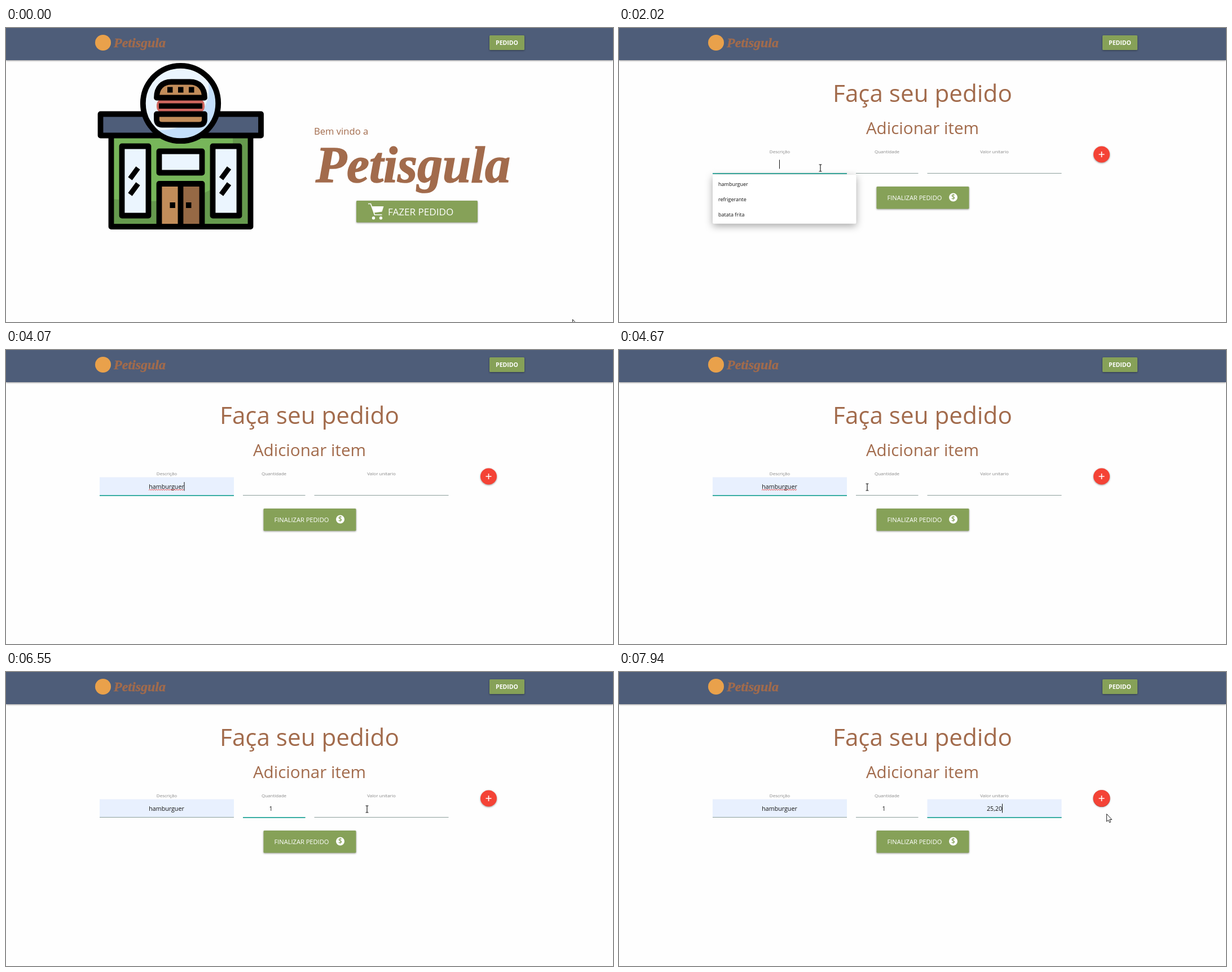
Write an HTML page that moves like this. It is 1076 px wide and 521 px high and loops after 8000 ms.

```html
<!DOCTYPE html>
<html lang="pt">
<head>
<meta charset="utf-8">
<title>Pedido</title>
<style>
  html, body { margin: 0; width: 100%; height: 100%; overflow: hidden; background: #fefefe; }
  svg { display: block; width: 100%; height: 100%; }
  text { font-family: "Open Sans", "Noto Sans", sans-serif; }
  .brand { font: italic bold 90px "Liberation Serif", "Times New Roman", serif; fill: #a26b4c; stroke: #a26b4c; stroke-width: 1.6px; }
  .brown { fill: #a26b4c; }
  .white { fill: #fff; }
  .green { fill: #86a158; }
  .raised { filter: drop-shadow(0 1.5px 1.5px rgba(0, 0, 0, .4)); }
  .popup { filter: drop-shadow(0 4px 7px rgba(0, 0, 0, .35)); }
  .mid { text-anchor: middle; }
  .label { font-size: 8px; fill: #868686; }
  .value { font-size: 10.7px; fill: #111; }
  .item { font-size: 9px; fill: #111; }
  .line { fill: #8c9f9c; }
  .focus { fill: #26a69a; }
  .filled { fill: #e8f0fe; }
  .ink { stroke: #000; stroke-width: 9.8; stroke-linejoin: round; }
  .glass { fill: #ebf5fe; }
  .bun { fill: #c28d5a; }
</style>
</head>
<body>
<svg viewBox="0 0 1076 521" preserveAspectRatio="none">
  <defs>
    <clipPath id="orderClip"><rect x="621" y="306" width="215" height="38.5" rx="1.5"/></clipPath>
    <g id="glint"><path d="M220 267L234 248M220 295L234 276" stroke="#000" stroke-width="9"/></g>
    <g id="pick">
      <rect x="3.5" y="2.5" width="221" height="26.5" rx="1.5" fill="#e0edfa" stroke="#62a0d2"/>
      <path d="M233.5 11.5h9.5M236.5 11.5v-1.5h3.5v1.5M234.5 11.5v9.5h7.5v-9.5M237 13.5v5.5M239.5 13.5v5.5" fill="none" stroke="#555"/>
    </g>
  </defs>
  <rect width="1076" height="521" fill="#fefefe"/>

  <!-- header -->
  <rect class="raised" width="1076" height="57" fill="#4e5d79"/>
  <circle cx="172" cy="26" r="14" fill="#e9a14b"/>
  <text class="brand" x="191" y="34" style="font-size:24px;stroke-width:.4px">Petisgula</text>
  <rect class="green raised" x="857" y="13" width="62" height="26" rx="1.5"/>
  <text class="white mid" x="888" y="29.5" font-size="10.5" font-weight="700">PEDIDO</text>

  <!-- welcome page -->
  <g data-on="0-1390">
    <rect x="186.500" y="180" width="247" height="172" fill="#77b65a"/>
    <path d="M402 190C406 290 350 318 187 303V352H433V190Z" fill="#669a4e"/>
    <rect class="ink" x="186.500" y="180" width="247" height="172" fill="none"/>
    <rect class="ink" x="167.500" y="152.500" width="284.500" height="38" fill="#4e5d79"/>
    <circle class="glass" cx="309.500" cy="133.500" r="67"/>
    <path d="M356.9 86.1C372 150 320 185 262.1 180.900A67 67 0 0 0 356.900 86.100Z" fill="#c4dffb"/>
    <circle class="ink" cx="309.500" cy="133.500" r="66.700" fill="none"/>
    <rect x="267" y="126" width="85" height="24" rx="10" fill="#cf665e"/>
    <path class="ink bun" d="M267 123.500C267 106 277 95.500 293 95.500H326C342 95.500 352 106 352 123.500Z"/>
    <path d="M286 104.500h9.500v10h-9.500zM305 104.500h9.500v10h-9.500zM324 104.500h9.500v10h-9.500zM271 133.500h77v9.500h-77z"/>
    <path class="ink bun" d="M267 152.500H352V162Q352 171.500 342 171.500H277Q267 171.500 267 162Z"/>
    <rect class="ink glass" x="205.500" y="209.500" width="47" height="123"/>
    <rect class="ink glass" x="366.500" y="209.500" width="47" height="123"/>
    <use href="#glint"/><use href="#glint" x="161.500"/>
    <rect class="ink glass" x="271.500" y="218.500" width="76" height="38"/>
    <rect class="bun" x="271.500" y="276" width="38" height="76"/>
    <rect x="309.500" y="276" width="38" height="76" fill="#966945"/>
    <path class="ink" d="M271.500 276h76v76h-76zM309.500 276v76" fill="none"/>
    <path d="M290.500 309h9.500v10h-9.500zM319 309h9.500v10h-9.500z"/>

    <text class="brown" x="546" y="189" font-size="16.6">Bem vindo a</text>
    <text class="brand" x="549" y="273">Petisgula</text>
    <rect class="green raised" x="621" y="306" width="215" height="38.500" rx="1.5"/>
    <g clip-path="url(#orderClip)">
      <rect id="hover" class="brown" x="621" y="306" width="215" height="38.500"/>
      <circle id="ripple" class="white" cx="797" cy="327" r="0" opacity=".19"/>
    </g>
    <path d="M642 311.500h4.500l7 19.500h13" fill="none" stroke="#fff" stroke-width="1.600"/>
    <path class="white" d="M648.500 316H669.500L666.500 325.500 652 327.500Z"/>
    <circle class="white" cx="651.500" cy="336.800" r="2.700"/><circle class="white" cx="664.500" cy="336.800" r="2.700"/>
    <text class="white" x="677" y="332" font-size="17.100">FAZER PEDIDO</text>
  </g>

  <!-- order page -->
  <g data-on="1390-8000">
    <text class="brown mid" x="538" y="131" font-size="42.2">Faça seu pedido</text>
    <text class="brown mid" x="538" y="188" font-size="29.6">Adicionar item</text>
    <text class="label mid" x="285" y="222">Descrição</text>
    <text class="label mid" x="475" y="222">Quantidade</text>
    <text class="label mid" x="665.5" y="222">Valor unitario</text>

    <rect class="filled" x="166" y="225.500" width="238" height="32" data-on="2230-8000"/>
    <rect class="filled" x="546.500" y="225.500" width="238" height="32" data-on="6960-8000"/>
    <rect class="line" x="166" y="257" width="238" height="1"/>
    <rect class="line" x="420" y="257" width="110.500" height="1"/>
    <rect class="line" x="546.500" y="257" width="238" height="1"/>
    <rect class="focus" x="166" y="257" width="238" height="1.800" data-on="1900-4950"/>
    <rect class="focus" x="420" y="257" width="110.500" height="1.800" data-on="4950-6750"/>
    <rect class="focus" x="546.500" y="257" width="238" height="1.800" data-on="6750-8000"/>

    <text class="value mid" x="284.500" y="246" data-on="2230-8000">hamburguer</text>
    <path id="squiggle" fill="none" stroke="#e53935" stroke-width=".9" data-on="3150-4950"/>
    <text class="value mid" x="469.500" y="246" data-on="5920-8000">1</text>
    <text class="value mid" x="665.500" y="246" data-on="6960-7280">5</text>
    <text class="value mid" x="665.500" y="246" data-on="7280-8000">25,20</text>

    <g data-on="4820-6150">
      <rect x="519.500" y="233.500" width="10.500" height="16" fill="#efefef"/>
      <rect x="519.500" y="241.500" width="10.500" height="8" fill="#c8c8c8"/>
      <path d="M522 239.500l2.800-3 2.800 3zM522 244l2.800 3 2.800-3z" fill="#444"/>
    </g>
    <g stroke="#111">
      <path d="M284.500 233.500v16" data-on="1900-2350,2850-3150"/>
      <path d="M316 234v15.500" data-on="3150-3550,4050-4580"/>
      <path d="M470 233.500v16" data-on="4950-5250,5550-5720"/>
      <path d="M473.500 233.500v16" data-on="5920-6350"/>
      <path d="M665.500 233.500v16" data-on="6750-7250"/>
      <path d="M679.500 233.500v16" data-on="7600-8000"/>
    </g>

    <circle id="pulse" cx="855.500" cy="224" r="14.500" fill="#f44336"/>
    <circle class="raised" cx="855.500" cy="224" r="14.500" fill="#f44336"/>
    <path d="M850.500 224h10M855.500 219v10" stroke="#fff" stroke-width="1.600"/>

    <rect class="green raised" x="456.500" y="281" width="164" height="39.500" rx="1.5"/>
    <text class="white" x="475.500" y="305" font-size="11.1">FINALIZAR PEDIDO</text>
    <circle class="white" cx="592.500" cy="300" r="7.500"/>
    <text class="green mid" x="592.500" y="304.300" font-size="12" font-weight="600">$</text>

    <g transform="translate(166 260)" data-on="1920-3150">
      <rect class="white popup" width="254.500" height="86.800" rx="2"/>
      <use href="#pick" data-on="2230-3150"/>
      <text class="item" x="10" y="19.500">hamburguer</text>
      <text class="item" x="10" y="46.500">refrigerante</text>
      <text class="item" x="10" y="73.500">batata frita</text>
    </g>
    <g transform="translate(546.500 260)" data-on="6800-7600">
      <rect class="white popup" width="254.500" height="86.800" rx="2"/>
      <use href="#pick" data-on="6960-7280"/>
      <use href="#pick" y="27" data-on="7280-7600"/>
      <text class="item" x="10" y="19.500">5</text>
      <text class="item" x="10" y="46.500">25,20</text>
      <text class="item" x="10" y="73.500">8,90</text>
    </g>
  </g>

  <g id="cursor" stroke-linejoin="round">
    <path d="M.5 .5V14L3.500 11.300 5.500 15.800 7.600 14.900 5.700 10.500H9.700Z" fill="#fff" stroke="#222"
      data-on="0-630,1390-1800,2180-3300,4220-4420,5350-6150,6910-8000"/>
    <path d="M-1.300 10V1.500Q0-.5 1.300 1.500V6.500L4 7 6.500 8V13L4.800 17.500H-1.500L-5 12Q-4.500 9.500-1.300 12Z" fill="#fff" stroke="#222"
      data-on="630-1390"/>
    <path d="M-2.500-6H-.7L0-5.300.7-6H2.500M0-5.300V5.300M-2.500 6H-.7L0 5.300.7 6H2.500" fill="none" stroke="#222" stroke-width="1.200"
      data-on="1800-2180,4420-5350,6150-6910"/>
  </g>
</svg>
<script>
  const LOOP = 8000;
  const $ = id => document.getElementById(id);
  const clamp = v => Math.min(1, Math.max(0, v));
  const smooth = v => v * v * (3 - 2 * v);

  // y of a cubic Bézier timing curve at x
  function bezier(x, x1, y1, x2, y2) {
    const at = (s, a, b) => 3 * a * s * (1 - s) ** 2 + 3 * b * s * s * (1 - s) + s ** 3;
    let low = 0, high = 1;
    for (let i = 0; i < 20; i++) {
      const mid = (low + high) / 2;
      if (at(mid, x1, x2) < x) low = mid; else high = mid;
    }
    return at(low, y1, y2);
  }

  // time, x, y
  const path = [
    [0, 1004, 516], [70, 1004, 516], [770, 798, 326], [1560, 798, 326],
    [1880, 357, 248], [2060, 357, 248], [2410, 322, 276], [4220, 322, 276],
    [4670, 440, 243], [4820, 440, 243], [5450, 520, 245], [5690, 520, 245],
    [5770, 521, 240], [5980, 521, 240], [6550, 640, 243], [6800, 640, 243],
    [7040, 615, 269], [7150, 615, 269], [7400, 614, 298], [7600, 614, 298],
    [7940, 864, 251], [LOOP, 864, 251]
  ];

  const timed = [...document.querySelectorAll("[data-on]")].map(el => ({
    el, spans: el.dataset.on.split(",").map(s => s.split("-").map(Number))
  }));

  let wave = "M253 248.5";
  for (let i = 1; i <= 31; i++) wave += `L${253 + i * 2} ${i % 2 ? 247 : 248.5}`;
  $("squiggle").setAttribute("d", wave);

  function moveCursor(t) {
    const i = path.findIndex(p => p[0] > t);
    const [t0, x0, y0] = path[i - 1], [t1, x1, y1] = path[i];
    const k = smooth((t - t0) / (t1 - t0));
    $("cursor").setAttribute("transform", `translate(${x0 + (x1 - x0) * k} ${y0 + (y1 - y0) * k})`);
  }

  function beat(t) {
    // the pulse restarts once, after a pause
    const start = t < 4220 ? 1450 : 4880;
    const phase = ((t - start) % 1000 + 1000) % 1000;
    const idle = t >= 4220 && t < start;
    const k = idle ? 1 : bezier(clamp(phase / 500), .24, 0, .38, 1);
    $("pulse").setAttribute("r", 14.5 * (1 + k / 2));
    $("pulse").setAttribute("opacity", 1 - k);
  }

  function draw(now) {
    const t = now % LOOP;
    for (const { el, spans } of timed) {
      el.style.display = spans.some(([a, b]) => t >= a && t < b) ? "" : "none";
    }
    $("hover").setAttribute("opacity", clamp((t - 630) / 140));
    $("ripple").setAttribute("r", 260 * bezier(clamp((t - 1000) / 700), 0, 0, .58, 1));
    beat(t);
    moveCursor(t);
  }

  const begin = performance.now();
  function tick() {
    draw(performance.now() - begin);
    requestAnimationFrame(tick);
  }
  tick();
</script>
</body>
</html>
```
